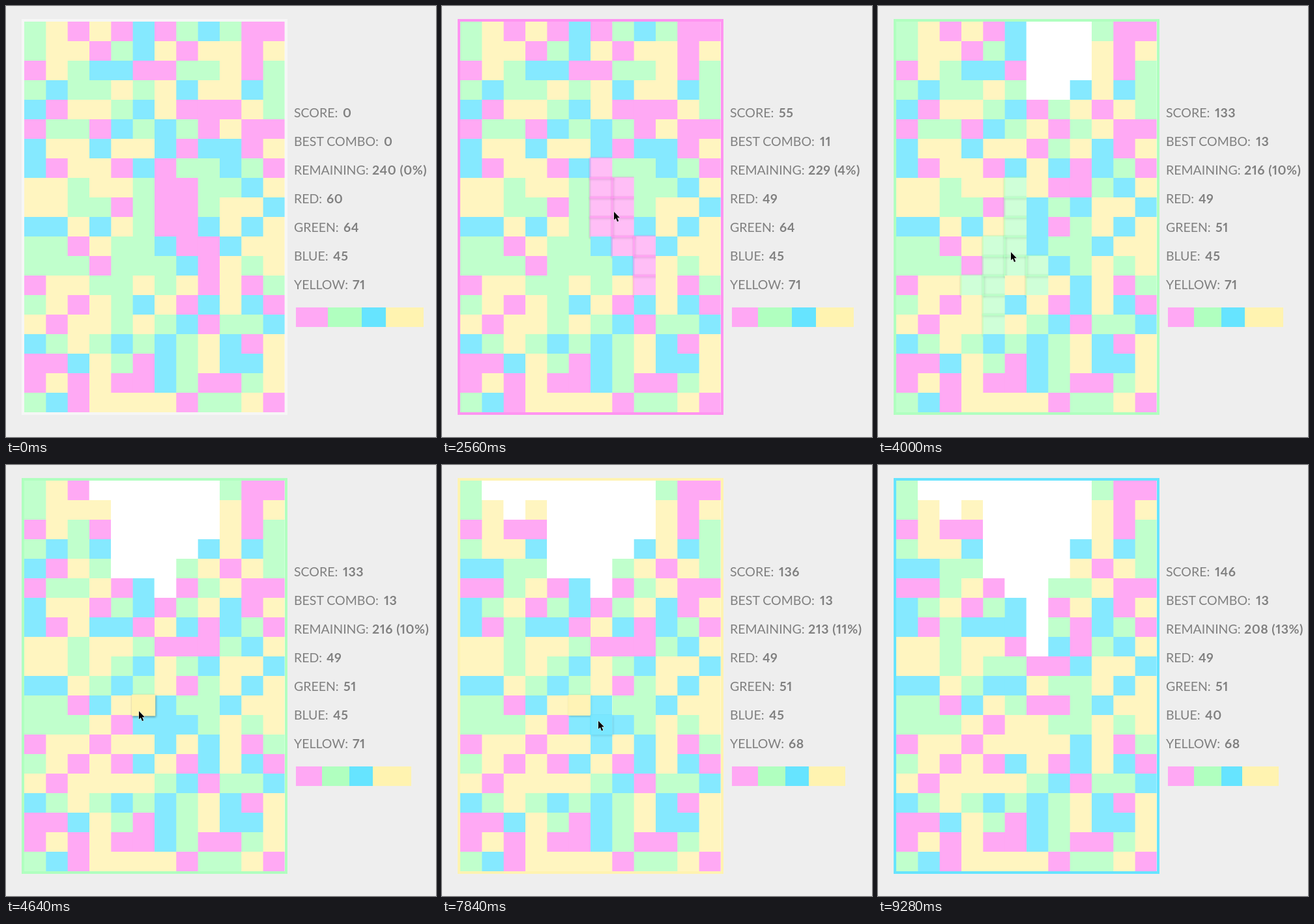
Recreate the animation shown at these times as an HTML page. Size 660x662 px, loop 9.92 s.

```html
<!DOCTYPE html>
<html lang="en">
<head>
<meta charset="utf-8">
<title>Colour blocks</title>
<style>
  html, body { margin: 0; width: 100%; height: 100%; overflow: hidden; background: #eee; }
  #board {
    position: absolute; left: 24px; top: 20px; width: 400px; height: 600px;
    border: 4px solid #f6f6f6; background: #fff;
  }
  #board div { position: absolute; left: 0; top: 0; height: 30px; }
  svg { position: absolute; left: 0; top: 0; z-index: 5; }
  text { font: 19.5px Lato, "Open Sans", sans-serif; fill: #808080; }
  .value { font-weight: 700; letter-spacing: .5px; font-variant-numeric: proportional-nums; }
</style>
</head>
<body>
<div id="board"></div>
<svg id="panel" width="660" height="662" viewBox="0 0 660 662">
  <path id="cursor" d="M0 0V12.6L2.9 9.9L5 15.2L7.2 14.3L5 9.2H8.9Z"
        fill="#000" stroke="#fff" stroke-width="1" paint-order="stroke"/>
</svg>
<script>
const COLS = 12, ROWS = 20, CELL_W = 400 / COLS, CELL_H = 30;
const LOOP = 9920, STEP = 160, FALL_DELAY = 480, HOVER_TIME = 160;
const COLORS = { P: '#ff94f1', G: '#b0ffbf', B: '#66e4ff', Y: '#fff3b0' };
const BAR_COLORS = { ...COLORS, P: '#ffa8f4' };
const START = `GYPYPBPGBGPP GYYPGBYPYYPY PYGBBPPGGYPG GBGGYGYBYYBG BPYYGBYPPPYG
PGGPBGBGPYPP BYYBYYBPBBPY BPYYPBPGGBGP YYGYYGPPGGBY YYGGPGPPGYYB BBYBYGPPBYBY
GGPYGGBPPBYY GGGPGGGBPYGY PYYGGYGYPYPG GYPYGBYPBYBP YPYYGYGBPGGB BGYGBGBGYBPY
PPBYGPBGYBBY PYPYPPBGPPGY GBPYYYYPGGYP`.split(/\s+/);

// Cursor stops: move begins, move ends, x, y
const STOPS = [
  [0, 1, 531, 603],
  [160, 1280, 264, 316],
  [3120, 3680, 204, 378],
  [5200, 5760, 114, 208],
  [7280, 7760, 226, 382],
  [7760, 7840, 240, 393],
  [8840, 9120, 349, 603]
];
const SHOWN = [160, 9130];
// Each turn: group lights up, click, stop the cursor rests at
const TURNS = [[1360, 2240, 1], [3520, 3840, 2], [6000, 6240, 3], [8160, 8480, 5]]
  .map(([lit, click, stop]) => ({ lit, click, stop, fall: click + FALL_DELAY }));

const clamp = v => Math.min(1, Math.max(0, v));
const mix = (a, b, u) => a + (b - a) * u;
const smooth = u => u * u * (3 - 2 * u);

function cellAt(x, y) {
  const c = Math.floor((x - 28) / CELL_W), r = Math.floor((y - 24) / CELL_H);
  return c >= 0 && c < COLS && r >= 0 && r < ROWS ? c * ROWS + r : -1;
}

function findGroup(cells, first) {
  const group = new Set([first]);
  for (const i of group) {
    const r = i % ROWS, near = [i - ROWS, i + ROWS];
    if (r > 0) near.push(i - 1);
    if (r < ROWS - 1) near.push(i + 1);
    for (const n of near) if (cells[n] === cells[first]) group.add(n);
  }
  return group;
}

function drop(cells, group) {
  const next = [];
  for (let c = 0; c < COLS; c++) {
    const column = [];
    for (let r = 0; r < ROWS; r++) {
      const i = c * ROWS + r;
      if (!group.has(i)) column.push(cells[i]);
    }
    while (column.length < ROWS) column.unshift('');
    next.push(...column);
  }
  return next;
}

function statsOf(cells, score, best) {
  const count = {};
  for (const k in COLORS) count[k] = cells.filter(v => v === k).length;
  const left = cells.filter(Boolean).length, total = COLS * ROWS;
  const done = Math.floor((total - left) / total * 100);
  return {
    bars: Object.values(count),
    values: [score, best, `${left} (${done}%)`, ...Object.values(count)]
  };
}

// Play the whole game once to get every board and score
const first = [];
for (let c = 0; c < COLS; c++) for (let r = 0; r < ROWS; r++) first.push(START[r][c]);
const boards = [first], stats = [statsOf(first, 0, 0)];
let score = 0, best = 0;
TURNS.forEach((turn, k) => {
  const at = cellAt(...STOPS[turn.stop].slice(2));
  turn.group = findGroup(boards[k], at);
  turn.color = COLORS[boards[k][at]];
  const n = turn.group.size;
  score += n * Math.floor(n / 2);
  best = Math.max(best, n);
  boards.push(drop(boards[k], turn.group));
  stats.push(statsOf(boards[k + 1], score, best));
});

// Page parts
const board = document.getElementById('board');
const panel = document.getElementById('panel');
const cursor = document.getElementById('cursor');
const tiles = first.map(() => board.appendChild(document.createElement('div')));

function svg(tag, attrs) {
  const el = document.createElementNS('http://www.w3.org/2000/svg', tag);
  for (const k in attrs) el.setAttribute(k, attrs[k]);
  return panel.insertBefore(el, cursor);
}

const values = [
  ['SCORE:', 517], ['BEST COMBO:', 580], ['REMAINING:', 562], ['RED:', 492],
  ['GREEN:', 518], ['BLUE:', 502], ['YELLOW:', 532]
].map(([label, x], i) => {
  const y = 171 + i * 44;
  svg('text', { x: 442, y }).textContent = label;
  return svg('text', { x, y, class: 'value' });
});
const bars = Object.values(BAR_COLORS).map(fill => svg('rect', { y: 463, height: 30, fill }));

function cursorAt(t) {
  let [, , x, y] = STOPS[0];
  for (const [from, to, nx, ny] of STOPS) {
    const u = smooth(clamp((t - from) / (to - from)));
    x = mix(x, nx, u);
    y = mix(y, ny, u);
  }
  return { x, y, shown: t >= SHOWN[0] && t < SHOWN[1] };
}

// How far each tile is raised: the share of recent time it was lit.
// Tiles start afresh after every fall.
function raisedAt(t, lastFall) {
  const levels = new Float32Array(COLS * ROWS), samples = 16;
  for (let s = 0; s < samples; s++) {
    const past = t - s * HOVER_TIME / samples;
    if (past < lastFall) break;
    const p = cursorAt(past);
    const turn = TURNS.find(v => past >= v.lit && past < v.fall);
    const lit = new Set(turn ? turn.group : []);
    if (p.shown) lit.add(cellAt(p.x, p.y));
    for (const i of lit) if (i >= 0) levels[i] += 1 / samples;
  }
  return levels;
}

function render(t) {
  const clicked = TURNS.filter(v => t >= v.click).length;
  const fallen = TURNS.filter(v => t >= v.fall).length;
  const fading = clicked > fallen ? TURNS[fallen] : null;
  const levels = raisedAt(t, fallen ? TURNS[fallen - 1].fall : 0);
  const cells = boards[fallen];

  tiles.forEach((el, i) => {
    const color = COLORS[cells[i]], up = smooth(clamp(levels[i]));
    const gone = fading && fading.group.has(i), flat = !up && !gone;
    const s = el.style;
    s.visibility = color ? 'visible' : 'hidden';
    if (!color) return;
    let opacity = mix(.8, 1, up);
    if (gone) opacity = mix(opacity, .6, clamp((t - fading.click) / 160));
    // Resting tiles are solid and reach under the next one, so no seam shows
    s.background = flat ? `color-mix(in srgb, ${color} 80%, white)` : color;
    s.opacity = flat ? 1 : opacity;
    s.width = CELL_W + (flat && cells[i + ROWS] ? 1 : 0) + 'px';
    s.transform = `translate(${Math.floor(i / ROWS) * CELL_W}px, ${i % ROWS * CELL_H}px)
      scale(${1 + .1 * up})`;
    s.boxShadow = up ? `1px 1px 3px rgba(0,0,0,${.4 * up})` : 'none';
    s.zIndex = up && !gone ? 1 : 0;
  });

  board.style.borderColor = clicked ? TURNS[clicked - 1].color : '#f6f6f6';
  values.forEach((el, i) => { el.textContent = stats[clicked].values[i]; });
  let x = 445;
  bars.forEach((el, i) => {
    const end = x + stats[clicked].bars[i] * .82;
    el.setAttribute('x', Math.floor(x));
    el.setAttribute('width', Math.floor(end) - Math.floor(x));
    x = end;
  });

  const p = cursorAt(t);
  cursor.setAttribute('transform', `translate(${p.x} ${p.y})`);
  cursor.setAttribute('visibility', p.shown ? 'visible' : 'hidden');
}

const began = performance.now();
let last = -1;
function tick() {
  const now = (performance.now() - began) % LOOP;
  const t = Math.floor(now / STEP) * STEP;
  if (t !== last) render(last = t);
  requestAnimationFrame(tick);
}
tick();
</script>
</body>
</html>
```
